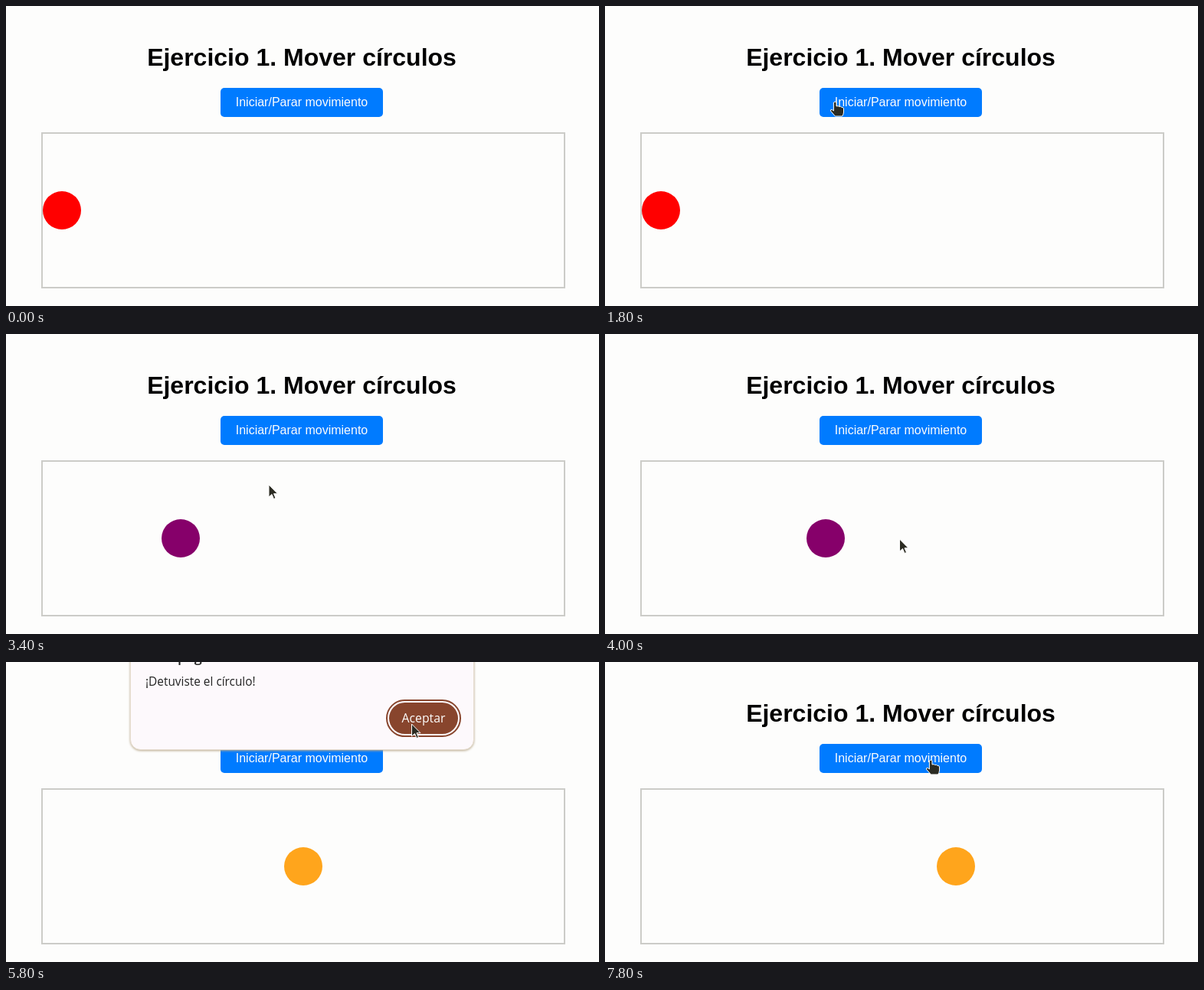
Recreate the animation shown at these times as an HTML page. Size 774 by 392 pixels, loop 8000 ms.

```html
<!DOCTYPE html>
<html lang="es">
<head>
<meta charset="utf-8">
<title>Mover círculos</title>
<style>
  html, body { margin: 0; width: 100%; height: 100%; overflow: hidden; background: #fdfdfc; }
  svg { display: block; width: 774px; height: 392px; }
  .page { font-family: "Liberation Sans", Arial, sans-serif; text-anchor: middle; }
  .dialog { font-family: "Open Sans", "Noto Sans", sans-serif; fill: #222; }
  .panel { fill: #fdf9fc; stroke: #e6dccf; filter: drop-shadow(0 1px 1.5px #b9a98c); }
  .pointer { fill: #2b2b22; stroke: #fdfdfc; stroke-linejoin: round; }
</style>
</head>
<body>
<svg viewBox="0 0 774 392">
  <g class="page">
    <text x="386" y="78" font-size="32" font-weight="700">Ejercicio 1. Mover círculos</text>
    <rect x="280" y="107" width="212" height="38" rx="5" fill="#007bff"/>
    <text x="386" y="131" font-size="16" fill="#fdfdfc">Iniciar/Parar movimiento</text>
  </g>
  <rect x="47" y="166" width="682" height="202" fill="none" stroke="#ccccc8" stroke-width="2"/>
  <circle id="ball" cy="267" r="25"/>
  <g id="dialog" class="dialog">
    <rect class="panel" x="162.5" y="-30" width="448" height="144.5" rx="13"/>
    <text x="183" y="0" font-size="18" font-weight="600">Esta página dice</text>
    <text x="182" y="31" font-size="15.4">¡Detuviste el círculo!</text>
    <rect x="497" y="50" width="96" height="47" rx="23.5" fill="none" stroke="#88452d" stroke-width="2"/>
    <rect x="500" y="53" width="90" height="41" rx="20.5" fill="#88452d"/>
    <text x="545" y="79" font-size="15.8" font-weight="500" text-anchor="middle" fill="#fdfdfc">Aceptar</text>
  </g>
  <g id="cursor" class="pointer">
    <path id="arrow" d="M-.5 0V16L3.5 12.5L6 18.5L8.5 17.4L6 11.7H11Z"/>
    <path id="hand" d="M-3.6 0Q-1.8-2 0 0V5Q2.4 4 3.6 5.5Q5.8 4.8 6.8 6.3Q9.2 6 9.5 8V13Q9.2 16 7.6 18H-1.6L-7.6 11Q-7.6 8.5-5.4 9.5L-3.6 11Z"/>
  </g>
</svg>
<script>
const LOOP = 8000, STEP = 200;
const $ = id => document.getElementById(id);

// Each row: time, then values.
const ballPath = [[0, 73], [1850, 73], [5000, 388], [7100, 388], [8000, 478]];
const ballColors = [[0, '#ff0000'], [2850, '#86006a'], [4850, '#ffa51c']];
const cursorPath = [
  [1000, 420, 350], [1600, 302, 126], [3000, 302, 126], [3800, 385, 268],
  [5100, 385, 268], [5700, 530, 81], [6300, 530, 81], [6800, 427, 129], [8000, 427, 129]
];
const dialogSpan = [5200, 6400];

function tween(rows, t) {
  const next = rows.findIndex(row => row[0] > t);
  if (next < 1) return rows.at(next).slice(1);
  const a = rows[next - 1], b = rows[next];
  const k = (t - a[0]) / (b[0] - a[0]);
  return a.slice(1).map((v, i) => v + (b[i + 1] - v) * k);
}

const show = (id, on) => $(id).setAttribute('visibility', on ? 'visible' : 'hidden');
const start = performance.now();

function draw(now) {
  const elapsed = Math.max(0, now - start) % LOOP;
  const t = Math.floor(elapsed / STEP) * STEP;

  $('ball').setAttribute('cx', tween(ballPath, t)[0]);
  $('ball').setAttribute('fill', ballColors.findLast(row => row[0] <= t)[1]);

  const open = t >= dialogSpan[0] && t < dialogSpan[1];
  show('dialog', open);

  const [x, y] = tween(cursorPath, t);
  const visible = t >= cursorPath[0][0];
  const overButton = !open && x > 280 && x < 492 && y > 107 && y < 145;
  $('cursor').setAttribute('transform', `translate(${x} ${y})`);
  show('arrow', visible && !overButton);
  show('hand', visible && overButton);
  requestAnimationFrame(draw);
}
draw(start);
</script>
</body>
</html>
```
